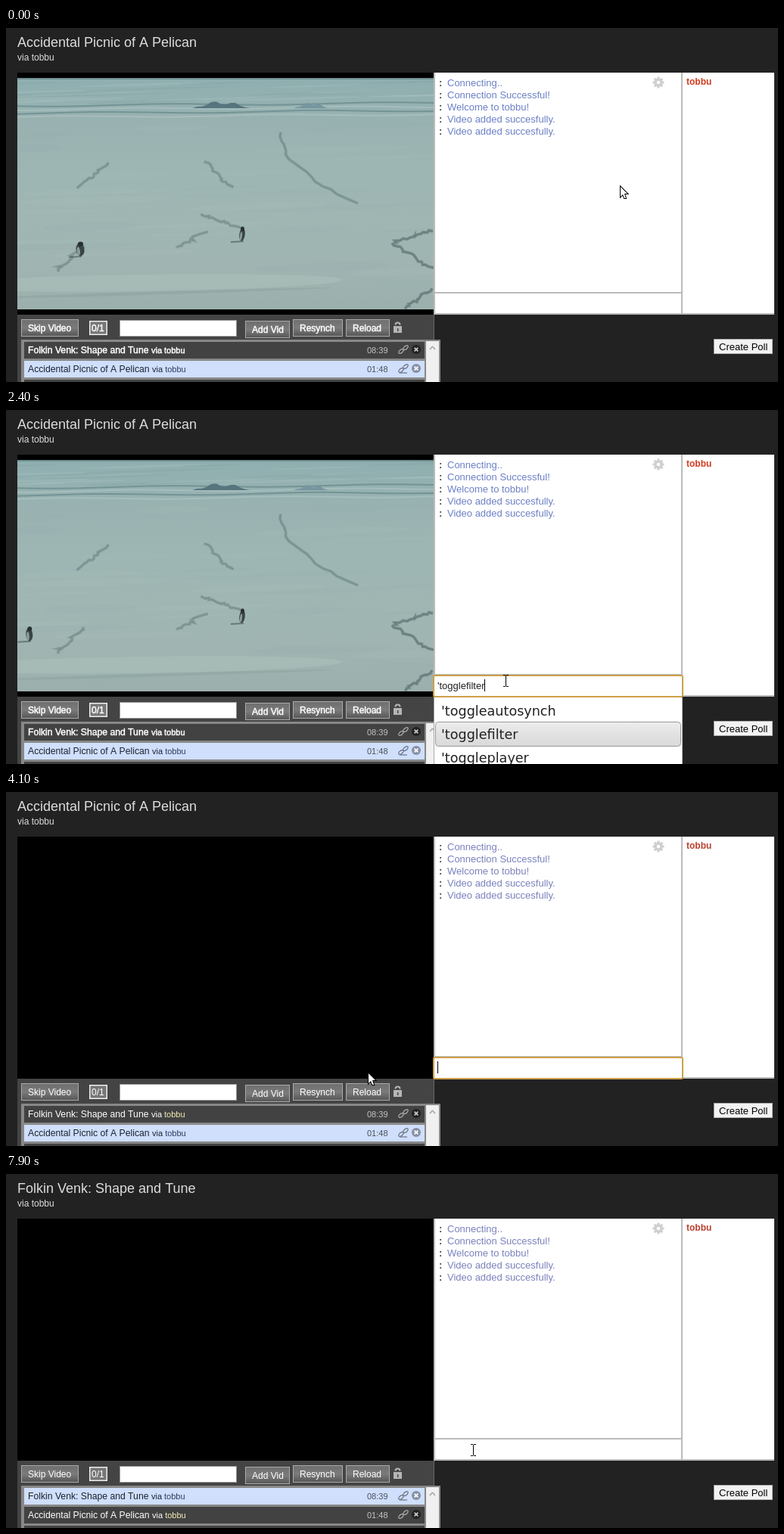
Write an HTML page with a canvas that moves like this. It is 1020 px wide and 468 px high and loops after 8 s.

```html
<!DOCTYPE html>
<html lang="en">
<head>
<meta charset="utf-8">
<title>Video room</title>
<style>
html, body { margin: 0; width: 100%; height: 100%; overflow: hidden; background: #222; }
canvas { display: block; width: 1020px; height: 468px; }
</style>
</head>
<body>
<canvas id="stage" width="1020" height="468"></canvas>
<script>
const c = document.getElementById('stage').getContext('2d');
const LOOP = 8000, STEP = 100;
const FOCUS = 900, TYPE = 1300, OPEN = 1800, ARROWS = 2100, CLOSE = 2700, SEND = 3000, BLUR = 4800;
const SKIPS = [5100, 6300, 7200];
const SANS = '"Liberation Sans", Arial, sans-serif';
const MENU_FONT = '17.6px "DejaVu Sans", Verdana, sans-serif';
const USER = 'tobbu';
const VIDEOS = [
  { title: 'Folkin Venk: Shape and Tune', time: '08:39' },
  { title: 'Accidental Picnic of A Pelican', time: '01:48' }
];
const CHAT = ['Connecting..', 'Connection Successful!', 'Welcome to ' + USER + '!',
  'Video added succesfully.', 'Video added succesfully.'];
const COMMANDS = ["'toggleautosynch", "'togglefilter", "'toggleplayer"];

// Pointer moves: begin, duration, goal
const HOME = { x: 811, y: 208 };
const MOVES = [
  { at: 200, dur: 600, x: 660, y: 358 },
  { at: 3800, dur: 800, x: 86, y: 397 },
  { at: 5700, dur: 100, x: 83, y: 398 },
  { at: 7200, dur: 300, x: 604, y: 385 },
  { at: 7600, dur: 100, x: 606, y: 379 },
  { at: 7800, dur: 100, x: 617, y: 365 }
];

const clamp = (v, lo, hi) => Math.min(hi, Math.max(lo, v));
const smooth = f => f * f * (3 - 2 * f);
const inside = (p, x0, y0, x1, y1) => p.x >= x0 && p.x <= x1 && p.y >= y0 && p.y <= y1;

function random(seed) {
  return () => (seed = (seed * 16807) % 2147483647) / 2147483647;
}

function box(x, y, w, h, fill) {
  c.fillStyle = fill;
  c.fillRect(x, y, w, h);
}

function frame(x, y, w, h, color, width = 1) {
  c.strokeStyle = color;
  c.lineWidth = width;
  c.strokeRect(x + width / 2, y + width / 2, w - width, h - width);
}

function rounded(x, y, w, h, r, fill, color, width) {
  c.beginPath();
  c.roundRect(x, y, w, h, r);
  c.fillStyle = fill;
  c.fill();
  c.strokeStyle = color;
  c.lineWidth = width;
  c.stroke();
}

function text(str, x, y, color, font, bold = 0) {
  c.font = font;
  c.fillStyle = color;
  c.fillText(str, x, y);
  if (bold) {
    c.strokeStyle = color;
    c.lineWidth = bold;
    c.strokeText(str, x, y);
  }
  return x + c.measureText(str).width;
}

function line(x0, y0, x1, y1, color, width = 1) {
  c.beginPath();
  c.moveTo(x0, y0);
  c.lineTo(x1, y1);
  c.strokeStyle = color;
  c.lineWidth = width;
  c.stroke();
}

function ellipse(x, y, rx, ry, fill, turn = 0) {
  c.beginPath();
  c.ellipse(x, y, rx, ry, turn, 0, Math.PI * 2);
  c.fillStyle = fill;
  c.fill();
}

function shade(y0, y1, ...colors) {
  const g = c.createLinearGradient(0, y0, 0, y1);
  colors.forEach((col, i) => g.addColorStop(i / (colors.length - 1), col));
  return g;
}

// Soft meandering crack; bend > 1 drops first, then runs sideways
function crack(rnd, x0, y0, x1, y1, bend = 1, dark = .3) {
  c.beginPath();
  for (let f = 0; f <= 1; f += 1 / 16) {
    const x = x0 + (x1 - x0) * f ** bend, y = y0 + (y1 - y0) * f;
    c.lineTo(x + Math.sin(f * 14) * 2 + (rnd() - .5) * 5, y + (rnd() - .5) * 3);
  }
  c.strokeStyle = `rgba(85,108,108,${dark})`;
  for (const width of [4, 1.4]) {
    c.lineWidth = width;
    c.stroke();
  }
}

function hummock(x, w, h, fill) {
  c.beginPath();
  for (let f = 0; f <= 1; f += 1 / 12) {
    c.lineTo(x + w * f, 106 - h * Math.sin(Math.PI * f) * (.8 + .3 * Math.cos(f * 17)));
  }
  c.fillStyle = fill;
  c.fill();
}

function streaks(rnd, count, y, h, light, dark) {
  for (let i = 0; i < count; i++) {
    ellipse(15 + rnd() * 550, y + rnd() * h, 40 + rnd() * 70, 1 + rnd() * h / 50,
      i % 2 ? light : dark, -.03);
  }
}

function ice() {
  const rnd = random(77);
  box(15, 66, 550, 306, shade(66, 372, '#8fafb0', '#99b2b1', '#9db5b3', '#9fb6b3', '#a0b5b2', '#9bb0ad'));
  box(15, 66, 550, 2, '#6d8c90');
  streaks(rnd, 24, 70, 28, 'rgba(180,202,201,.22)', 'rgba(115,148,152,.18)');
  streaks(rnd, 30, 125, 240, 'rgba(180,199,195,.08)', 'rgba(120,148,147,.06)');

  // Distant ridge
  for (let i = 0; i < 4; i++) {
    c.beginPath();
    for (let x = 15; x <= 565; x += 25) c.lineTo(x, 103 + i * 5 - x / 140 + Math.sin(x / 45 + i) * 1.2);
    c.strokeStyle = i % 2 ? 'rgba(185,205,202,.45)' : 'rgba(85,118,122,.5)';
    c.lineWidth = 2;
    c.stroke();
  }
  hummock(246, 76, 9, '#56757f');
  hummock(380, 46, 7, '#7595a0');

  crack(rnd, 362, 138, 463, 232, 2);
  crack(rnd, 264, 178, 297, 210);
  crack(rnd, 134, 179, 94, 212);
  crack(rnd, 258, 247, 308, 264);
  crack(rnd, 264, 268, 225, 291);
  crack(rnd, 103, 288, 66, 321);
  crack(rnd, 562, 268, 510, 284, 1, .5);
  crack(rnd, 510, 284, 562, 318, 1, .5);
  crack(rnd, 562, 345, 528, 370, 1, .5);

  // Foreground drift
  ellipse(180, 337, 265, 11, 'rgba(182,198,191,.35)', -.015);
  ellipse(180, 351, 250, 2, 'rgba(120,143,140,.25)', -.03);
}

function penguin(x, y, width, lean) {
  line(x + 2, y + 10, x - 15, y + 11, 'rgba(65,80,80,.6)', 2);
  ellipse(x, y + 1, width, 8.5, '#394445', lean);
  ellipse(x - width * .4, y + 3, width * .4, 5.5, '#8b9b99', lean);
  ellipse(x + .5, y - 6.5, width * .65, 3, '#283032');
}

function video(t) {
  box(15, 59, 550, 320, '#000');
  if (t >= SEND) return;
  c.save();
  c.beginPath();
  c.rect(15, 66, 550, 306);
  c.clip();
  ice();
  penguin(312, 272, 3.7, .12);
  penguin(98 - t * .028, 292 + t * .0016, 4.5 + clamp(1 - t / 900, 0, 1), -.15 + Math.sin(t / 160) * .1);
  c.restore();
}

function button(label, x, y, w, bold, hover) {
  box(x, y, w, 23, shade(y, y + 23, '#6e6e6e', '#7b7b7b', '#555'));
  frame(x, y, w, 23, hover ? '#4b4b4b' : '#aaa');
  text(label, x + 9, y + 16, '#fff', '12px ' + SANS, bold);
}

function lock() {
  c.beginPath();
  c.arc(517.5, 392.5, 3, Math.PI, 0);
  c.strokeStyle = '#b5b5b5';
  c.lineWidth = 2;
  c.stroke();
  box(512, 394, 11, 9, '#b5b5b5');
  box(517, 397, 1.5, 4, '#444');
}

function controls(bold, hover) {
  box(15, 379, 551, 89, '#444');
  box(565, 379, 1, 33, '#666');
  button('Skip Video', 20, 385, 76, bold, hover);
  box(110, 387, 24, 19, '#777');
  frame(110, 387, 24, 19, '#eee', 1.5);
  text('0/1', 113, 401, '#fff', '12px ' + SANS, bold);
  box(150, 386, 155, 22, '#fff');
  frame(150, 386, 155, 22, '#999');
  button('Add Vid', 316, 387, 59, bold);
  button('Resynch', 379, 385, 66, bold);
  button('Reload', 449, 385, 58, bold);
  lock();
}

function linkIcon(x, y, color, underline) {
  for (const d of [-3, 3]) {
    c.beginPath();
    c.ellipse(x + d, y - d * .8, 3.8, 2, -.7, 0, Math.PI * 2);
    c.strokeStyle = color;
    c.lineWidth = 1.3;
    c.stroke();
  }
  if (underline) line(x - 5, y + 6, x + 5, y + 6, color, 1.2);
}

function closeIcon(x, y, disc, cross) {
  ellipse(x, y, 6, 6, disc);
  for (const d of [-2.4, 2.4]) line(x - 2.4, y - d, x + 2.4, y + d, cross, 1.7);
}

function row(item, y, active, late, bold) {
  box(24, y, 529, 22, active ? '#cfdffc' : '#424242');
  const ink = active ? '#1c2230' : '#fff', weight = active ? 0 : bold;
  const base = y + 15, mid = y + 10;
  let x = text(item.title, 29, base, ink, '12.2px ' + SANS, weight);
  x = text('via ', x + 3.5, base, ink, '11px ' + SANS, weight);
  text(USER, x, base, active ? '#2b3a60' : late ? '#f6efb4' : '#fff', '11px ' + SANS, weight);
  text(item.time, 477, base, active ? '#4a4f5c' : '#c4c4c4', '11px ' + SANS);
  linkIcon(525, mid, active ? '#6d7486' : '#aaa', active);
  closeIcon(542, mid, active ? '#8791a6' : '#222', active ? '#fff' : '#c8c8c8');
}

function playlist(current, late, bold) {
  box(20, 412, 554, 56, '#888');
  VIDEOS.forEach((v, i) => row(v, 415 + i * 25, i === current, late, bold));
  box(24, 465, 529, 3, '#424242');
  box(555, 414, 17, 54, '#f0f0f0');
  for (const d of [-3.5, 3.5]) line(563.5, 421, 563.5 + d, 425, '#a5a5a5', 1.5);
}

function gear(x, y) {
  for (let a = 0; a < Math.PI; a += Math.PI / 4) {
    const dx = Math.cos(a) * 7.5, dy = Math.sin(a) * 7.5;
    line(x - dx, y - dy, x + dx, y + dy, '#cfcfcf', 3);
  }
  ellipse(x, y, 5.8, 5.8, '#cfcfcf');
  ellipse(x, y, 2.3, 2.3, '#fff');
}

function chat(late) {
  box(565, 59, 450, 320, '#bbb');
  box(567, 59, 325, 290, '#fff');
  box(894, 59, 121, 318, '#fff');
  box(567, 351, 325, 26, '#fff');
  CHAT.forEach((msg, i) => {
    text(':', 572, 77 + i * 16, '#444', 'bold 13px ' + SANS);
    text(msg, 583, 77 + i * 16, late ? '#7a82bd' : '#6c80c6', '13px ' + SANS);
  });
  text(USER, 899, 75, late ? '#b9402f' : '#d23c1e', 'bold 12px ' + SANS);
  gear(862, 72);
}

const choice = t => clamp(Math.floor((t - ARROWS) / 200), 0, 2);

// Input value and the time of the last key
function typed(t) {
  if (t >= SEND) return ['', SEND];
  const pick = choice(t);
  if (pick) return [COMMANDS[pick], ARROWS + pick * 200];
  const keys = clamp(Math.floor((t - TYPE) / 150) + 1, 0, 3);
  return ["'to".slice(0, keys), keys ? TYPE + (keys - 1) * 150 : FOCUS];
}

function entry(t) {
  if (t < FOCUS || t >= BLUR) return;
  rounded(565, 351, 329, 28, 2, '#fff', '#cfa04a', 2);
  const [value, since] = typed(t);
  const end = text(value, 570, 369, '#222', '13px ' + SANS);
  if (Math.floor((t - since) / 500) % 2 === 0) box(Math.floor(end), 356, 1, 16, '#000');
}

function menu(t) {
  if (t < OPEN || t >= CLOSE) return;
  box(565, 380, 329, 88, '#aaa');
  box(566, 380, 327, 88, '#fff');
  COMMANDS.forEach((cmd, i) => {
    const y = 382 + i * 31;
    if (i === choice(t)) {
      rounded(567.5, y - .5, 324, 32, 4, shade(y, y + 31, '#ededed', '#e2e2e2', '#dadada'), '#999', 1);
    }
    text(cmd, 575, y + 22, '#222', MENU_FONT);
  });
}

function pointerAt(t) {
  return MOVES.reduce((p, m) => {
    const e = smooth(clamp((t - m.at) / m.dur, 0, 1));
    return { x: Math.round(p.x + (m.x - p.x) * e), y: Math.round(p.y + (m.y - p.y) * e) };
  }, HOME);
}

function outlined(shape) {
  c.strokeStyle = '#000';
  c.lineWidth = 2;
  c.stroke(shape);
  c.fillStyle = '#fff';
  c.fill(shape);
}

function hand() {
  const shape = new Path2D();
  shape.roundRect(-1, 1, 3, 14, 1.5);
  for (let i = 1; i < 4; i++) shape.roundRect(i * 3 - 1, 5 + i, 3, 9, 1.5);
  shape.roundRect(-5, 11, 5, 4, 2);
  shape.roundRect(-3, 12, 14, 8, 3);
  outlined(shape);
  for (let i = 1; i < 4; i++) line(i * 3 - 1, 6 + i, i * 3 - 1, 12, '#000');
}

function beam() {
  line(.5, -7, .5, 7, '#000');
  for (const y of [-7.5, 7.5]) {
    line(-3, y, 0, y, '#000');
    line(1, y, 4, y, '#000');
  }
}

function cursor(p, hover) {
  c.save();
  c.translate(p.x, p.y);
  if (hover) hand();
  else if (inside(p, 566, 350, 893, 378)) beam();
  else outlined(new Path2D('M1 2V15L4 12L6 17H8L6 11H10Z'));
  c.restore();
}

function draw(t) {
  const late = t >= SEND, bold = late ? 0 : .45;
  const current = (1 + SKIPS.filter(s => t >= s).length) % 2;
  const pointer = pointerAt(t);
  const hover = inside(pointer, 20, 385, 96, 408);

  box(0, 0, 1020, 468, '#222');
  text(VIDEOS[current].title, 15, 25, '#ddd', '18px ' + SANS);
  text('via ' + USER, 15, 43, '#ddd', '12px ' + SANS);
  video(t);
  controls(bold, hover);
  playlist(current, late, bold);
  chat(late);
  box(935, 411, 78, 20, '#f2f2f2');
  frame(935, 411, 78, 20, '#aaa');
  text('Create Poll', 942, 426, '#000', '13px ' + SANS);
  entry(t);
  menu(t);
  cursor(pointer, hover);
}

const start = performance.now();
let shown = -1;
function tick() {
  const t = Math.floor(((performance.now() - start) % LOOP) / STEP) * STEP;
  if (t !== shown) draw(shown = t);
  requestAnimationFrame(tick);
}
tick();
</script>
</body>
</html>
```
